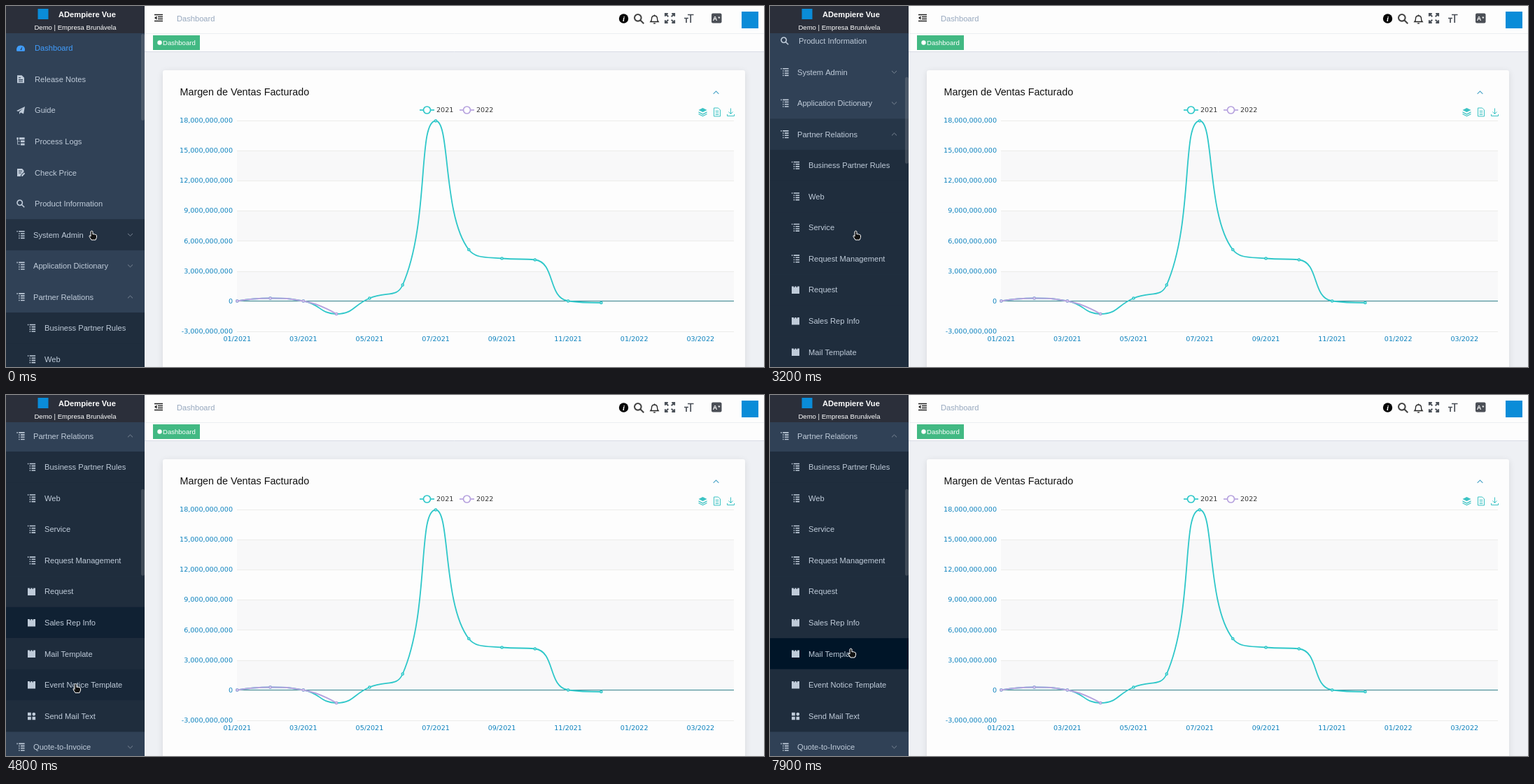
Write an HTML page with a canvas that moves like this. It is 1083 px wide and 517 px high and loops after 8000 ms.

```html
<!DOCTYPE html>
<html lang="es">
<head>
<meta charset="utf-8">
<style>
html, body { margin: 0; width: 100%; height: 100%; overflow: hidden; background: #eef0f4; }
canvas { display: block; }
</style>
</head>
<body>
<canvas id="stage" width="1083" height="517"></canvas>
<script>
const ctx = document.getElementById('stage').getContext('2d');
const SANS = '"Liberation Sans", Arial, sans-serif';
const CHART = '"DejaVu Sans", sans-serif';
const LOOP = 8000, PITCH = 44.55, MENU_TOP = 38, FADE = 300;
const TEAL = '#2ec7c9', PURPLE = '#b6a2de', MUTED = '#bfcbd9', BLUE = '#0a8cd8';

// Icons are centred on 0,0: [path, stroke width] with 0 meaning filled.
const ICONS = {
  gauge: ['M-5.5 4.5A6 6 0 1 1 5.5 4.5ZM-.7 2.5L2.5-2.5L1.2 3Z', 0],
  doc: ['M-5-5.5H1.5L5-2V5.5H-5ZM-3-2.7H0V-1.6H-3ZM-3 .2H3V1.3H-3ZM-3 2.6H3V3.7H-3Z', 0],
  plane: ['M-6 .5L6-5.5L4 5L0 3L-2 5.5V2L3.2-2.7L-3.5 1.7Z', 0],
  logs: ['M-5.6-5.6H-3.2V-2.8H-4V-.4H-.9V.4H-4V3.8H-.9V4.6H-4.8V-2.8H-5.6ZM-2-5.6H5.6V-2.8H-2ZM0-1.4H5.6V1.4H0ZM0 2.8H5.6V5.6H0Z', 0],
  check: ['M-5-5.5H2L4.5-3V-1L0 3.5V5.5H-5ZM-3-2.8H2V-1.7H-3ZM-3 0H1V1.1H-3ZM1.2 5.5V3.6L5 0L6.2 1.5L2.5 5.5Z', 0],
  search: ['M2.4-1.3A3.7 3.7 0 1 1-5-1.3A3.7 3.7 0 1 1 2.4-1.3M1.4 1.4L5.2 5.2', 1.6],
  tree: ['M-5.6-4.8H-4.2M-2.8-4.8H5.6M-2.8-1.6H-1.4M0-1.6H5.6M-2.8 1.6H-1.4M0 1.6H5.6M-2.8 4.8H-1.4M0 4.8H5.6', 1.6],
  window: ['M-5.5-5H-2.5V-3.5H-1.3V-5H1.2V-3.5H2.4V-5H5.5V5.5H-5.5Z', 0],
  grid: ['M-5.5-5H-.7V-.3H-5.5ZM-5.5 1H-.7V5.6H-5.5ZM1 1H5.6V5.6H1ZM5.7-2.6A2.4 2.4 0 1 1 .9-2.6A2.4 2.4 0 1 1 5.7-2.6', 0],
  down: ['M-3.5-1.7L0 1.7L3.5-1.7', 1],
  up: ['M-3.5 1.7L0-1.7L3.5 1.7', 1],
  fold: ['M-6-5.2H6V-3.8H-6ZM-1-2.2H6V-.8H-1ZM-1 .8H6V2.2H-1ZM-6 3.8H6V5.2H-6ZM-2.5-2.7L-6 0L-2.5 2.7Z', 0],
  bell: ['M-5.5 3.5Q-4 2-4-1Q-4-5 0-5Q4-5 4-1Q4 2 5.5 3.5ZM-1.5 5.8H1.5M0-6.5V-5', 1.3],
  expand: ['M-6-2.5V-6H-2.5M-6-6L-2-2M2.5-6H6V-2.5M6-6L2-2M-6 2.5V6H-2.5M-6 6L-2 2M6 2.5V6H2.5M6 6L2 2', 1.8],
  fontSize: ['M-2-5.5H6.5M2.2-5.5V6M-7-.5H-1M-4-.5V6', 1.7],
  layers: ['M-6-3L0-6L6-3L0 0ZM-6-.7L0 2.3L6-.7V.7L0 3.7L-6 .7ZM-6 2L0 5L6 2V3.2L0 6.2L-6 3.2Z', 0],
  sheet: ['M-4.5-6H1.5L4.5-3V6H-4.5ZM-2.3-1.5H2.3M-2.3 1H2.3M-2.3 3.5H2.3', 1],
  download: ['M0-5.5V2.5M-3-.5L0 2.7L3-.5M-5 3V5.5H5V3', 1],
  hand: ['M-1.5 1Q0-1 1.5 1V5Q2.5 4 3.5 5Q4.5 4.2 5.3 5.5Q6.8 5.2 7 6.7V9.5L5.5 13H-.5L-3.3 8.5Q-4 6.7-2.6 6.8L-1.5 8Z', 1]
};
for (const icon of Object.values(ICONS)) icon[0] = new Path2D(icon[0]);

const MENU = [
  ['Dashboard', 'gauge'], ['Release Notes', 'doc'], ['Guide', 'plane'],
  ['Process Logs', 'logs'], ['Check Price', 'check'], ['Product Information', 'search'],
  ['System Admin', 'tree', 'down'], ['Application Dictionary', 'tree', 'down'],
  ['Partner Relations', 'tree', 'up'],
  ['Business Partner Rules', 'tree'], ['Web', 'tree'], ['Service', 'tree'],
  ['Request Management', 'tree'], ['Request', 'window'], ['Sales Rep Info', 'window'],
  ['Mail Template', 'window'], ['Event Notice Template', 'window'], ['Send Mail Text', 'grid'],
  ['Quote-to-Invoice', 'tree', 'down'], ['Requisition-to-Invoice', 'tree', 'down'],
  ['Returns', 'tree', 'down']
];

const SCROLL = [[1200, 0], [1500, 95], [2950, 95], [3180, 233], [3480, 233], [3660, 454], [4150, 454], [4400, 358]];
const POINTER = [[4590, 122.5, 322], [4800, 99.5, 413.5], [5200, 93.5, 472], [6500, 93.5, 472], [7100, 115.5, 363]];
// [time, hovered row]; -1 while the list is moving
const HOVER = [[-FADE, 6], [1500, 8], [3110, -1], [3200, 11], [3650, 16], [4180, -1], [4330, 14],
  [4650, 15], [4730, 16], [4980, 17], [6690, 16], [6850, 15], [1e6, -1]];

const clamp = (v, a, b) => Math.max(Math.min(a, b), Math.min(Math.max(a, b), v));

function track(keys, t, column = 1) {
  const i = keys.findIndex(k => k[0] > t);
  if (i === 0) return keys[0][column];
  if (i < 0) return keys[keys.length - 1][column];
  const a = keys[i - 1], b = keys[i], u = (t - a[0]) / (b[0] - a[0]);
  return a[column] + (b[column] - a[column]) * u * u * (3 - 2 * u);
}

function rect(x, y, w, h, color) {
  ctx.fillStyle = color;
  ctx.fillRect(x, y, w, h);
}

function round(x, y, w, h, r, color) {
  ctx.fillStyle = color;
  ctx.beginPath();
  ctx.roundRect(x, y, w, h, r);
  ctx.fill();
}

function text(str, x, y, size, color, align = 'left', family = SANS, style = '') {
  ctx.font = `${style} ${size}px ${family}`;
  ctx.textAlign = align;
  ctx.fillStyle = color;
  ctx.fillText(str, x, y);
}

function icon(name, x, y, color, { fill, scale = 1 } = {}) {
  const [path, width] = ICONS[name];
  ctx.save();
  ctx.translate(x, y);
  ctx.scale(scale, scale);
  ctx.fillStyle = fill || color;
  ctx.strokeStyle = color;
  ctx.lineWidth = width;
  if (fill || !width) ctx.fill(path, 'evenodd');
  if (width) ctx.stroke(path);
  ctx.restore();
}

function line(x1, y1, x2, y2, color, width = 1) {
  ctx.strokeStyle = color;
  ctx.lineWidth = width;
  ctx.beginPath();
  ctx.moveTo(x1, y1);
  ctx.lineTo(x2, y2);
  ctx.stroke();
}

function disc(x, y, r, fill, stroke, width) {
  ctx.beginPath();
  ctx.arc(x, y, r, 0, 7);
  ctx.fillStyle = fill;
  ctx.fill();
  if (!stroke) return;
  ctx.strokeStyle = stroke;
  ctx.lineWidth = width;
  ctx.stroke();
}

// Smooth line whose control points never pass the neighbouring values.
function series(ys, color) {
  const pts = ys.map((y, i) => [330.3 + 47.28 * i, y]);
  let lead = pts[0];
  ctx.beginPath();
  ctx.moveTo(...lead);
  for (let i = 1; i < pts.length; i++) {
    const prev = pts[i - 1], p = pts[i], next = pts[i + 1];
    let tail = p, after = p;
    if (next) {
      const before = Math.hypot(p[0] - prev[0], p[1] - prev[1]);
      const ahead = Math.hypot(next[0] - p[0], next[1] - p[1]);
      tail = p.map((v, k) => {
        const out = clamp(v + (next[k] - prev[k]) * .5 * ahead / (before + ahead), v, next[k]);
        return clamp(v - (out - v) * before / ahead, prev[k], v);
      });
      after = p.map((v, k) => v + (v - tail[k]) * ahead / before);
    }
    ctx.bezierCurveTo(...lead, ...tail, ...p);
    lead = after;
  }
  ctx.strokeStyle = color;
  ctx.lineWidth = 1.8;
  ctx.stroke();
  for (const [x, y] of pts) disc(x, y, 1.5, '#fff', color, 1.6);
}

function legend(x, label, color) {
  line(x, 149, x + 21, 149, color, 1.7);
  disc(x + 10.5, 149, 5, '#fff', color, 1.7);
  text(label, x + 24, 152.3, 9.55, '#333', 'left', CHART);
}

function drawChart() {
  for (let i = 0; i < 8; i++) {
    const y = 163.5 + 43.2 * i;
    if (i % 2 && i < 7) rect(330, y, 710, 43.2, '#f8f8f9');
    line(330, Math.round(y) + .5, 1040, Math.round(y) + .5, '#ececea');
    const value = 18 - 3 * i;
    text(value ? value + ',000,000,000' : '0', 324, y + 3.3, 9.55, '#0a80bd', 'right', CHART);
  }
  line(330, 422.5, 1040, 422.5, '#3d8d98', 1.2);
  for (let m = 0; m < 16; m += 2) {
    const label = String(m % 12 + 1).padStart(2, '0') + '/' + (m < 12 ? 2021 : 2022);
    text(label, 330.3 + 47.28 * m, 480, 9.55, '#0a80bd', 'center', CHART);
  }
  series([422.5, 418.5, 422.5, 441, 418.5, 399.5, 164.5, 349, 361.5, 363.5, 422.5, 425], TEAL);
  series([422.5, 418.5, 422.5, 441], PURPLE);
  legend(591, '2021', TEAL);
  legend(648, '2022', PURPLE);
  ['layers', 'sheet', 'download'].forEach((name, i) => icon(name, [995.5, 1016, 1035.5][i], 152, '#3cc3c4'));
}

function drawPage() {
  rect(198, 0, 885, 517, '#eef0f4');
  rect(198, 0, 885, 65, '#fdfdfd');
  line(198, 39.5, 1083, 39.5, '#eceef1');
  line(198, 65.5, 1083, 65.5, '#d8dce5');
  icon('fold', 218, 17, '#222');
  text('Dashboard', 244, 22, 11.14, '#97a8be');

  disc(882.5, 18, 6.7, '#050505');
  text('i', 882.5, 22, 11, '#fff', 'center', '"Liberation Serif", serif', 'italic bold');
  icon('search', 904.5, 18.5, '#444', { scale: 1.3 });
  icon('bell', 926.5, 19, '#222');
  icon('expand', 948.5, 17.5, '#4a5058', { scale: 1.1 });
  icon('fontSize', 976, 18, '#4a4f57');
  round(1008, 10.5, 14.5, 14, 2, '#4b4f56');
  text('A', 1013, 21, 9, '#fff', 'center', SANS, 'bold');
  text('*', 1018.7, 20, 8, '#fff', 'center', SANS, 'bold');
  rect(1051, 8, 24, 24, BLUE);

  rect(210, 42, 67, 21, '#42b983');
  disc(219.5, 52.5, 3.2, '#fff');
  text('Dashboard', 224, 55.8, 9.55, '#fff');

  ctx.save();
  ctx.shadowColor = 'rgba(0,0,0,.1)';
  ctx.shadowBlur = 10;
  ctx.shadowOffsetY = 2;
  round(224, 92, 832, 440, 3, '#fdfdfd');
  ctx.restore();
  text('Margen de Ventas Facturado', 248.5, 128, 14.32, '#111');
  icon('up', 1014.5, 124, '#4aa3c7', { scale: 1.1 });
  drawChart();
}

function hoverAlpha(row, t) {
  let alpha = 0;
  for (let i = 0; i < HOVER.length - 1; i++) {
    if (HOVER[i][1] !== row) continue;
    const start = HOVER[i][0], end = HOVER[i + 1][0];
    const rise = clamp((Math.min(t, end) - start) / FADE, 0, 1);
    alpha = Math.max(alpha, rise - Math.max(0, t - end) / FADE);
  }
  return alpha;
}

function drawMenu(t) {
  const scroll = track(SCROLL, t);
  rect(0, 0, 198, 517, '#304156');
  MENU.forEach(([label, glyph, arrow], row) => {
    const top = MENU_TOP + row * PITCH - scroll, mid = top + 22.3;
    if (top > 517 || top < -PITCH) return;
    const child = row > 8 && row < 18;
    const color = row ? MUTED : '#409eff';
    if (child) rect(0, top, 198, PITCH + .5, '#1f2d3d');
    ctx.globalAlpha = hoverAlpha(row, t);
    rect(0, top, 198, PITCH, child ? '#001528' : '#233142');
    ctx.globalAlpha = 1;
    icon(glyph, child ? 36.5 : 21, mid, color);
    text(label, child ? 55 : glyph === 'tree' ? 39 : 41, mid + 4, 11.14, color);
    if (arrow) icon(arrow, 177.5, mid, '#7c8896');
  });
  round(193, 40 + scroll * .265, 5, 124, 2.5, 'rgba(144,147,153,.3)');

  rect(0, 0, 198, 39, '#2b2f3a');
  rect(45.5, 4, 15, 15, BLUE);
  text('ADempiere Vue', 75, 16, 11.14, '#fff', 'left', SANS, 'bold');
  text('Demo | Empresa Brunávela', 99, 33.5, 9.55, '#fff', 'center');
}

function draw(now) {
  const t = now % LOOP;
  drawPage();
  drawMenu(t);
  icon('hand', track(POINTER, t, 1), track(POINTER, t, 2), '#fff', { fill: '#111' });
  requestAnimationFrame(draw);
}
requestAnimationFrame(draw);
</script>
</body>
</html>
```
